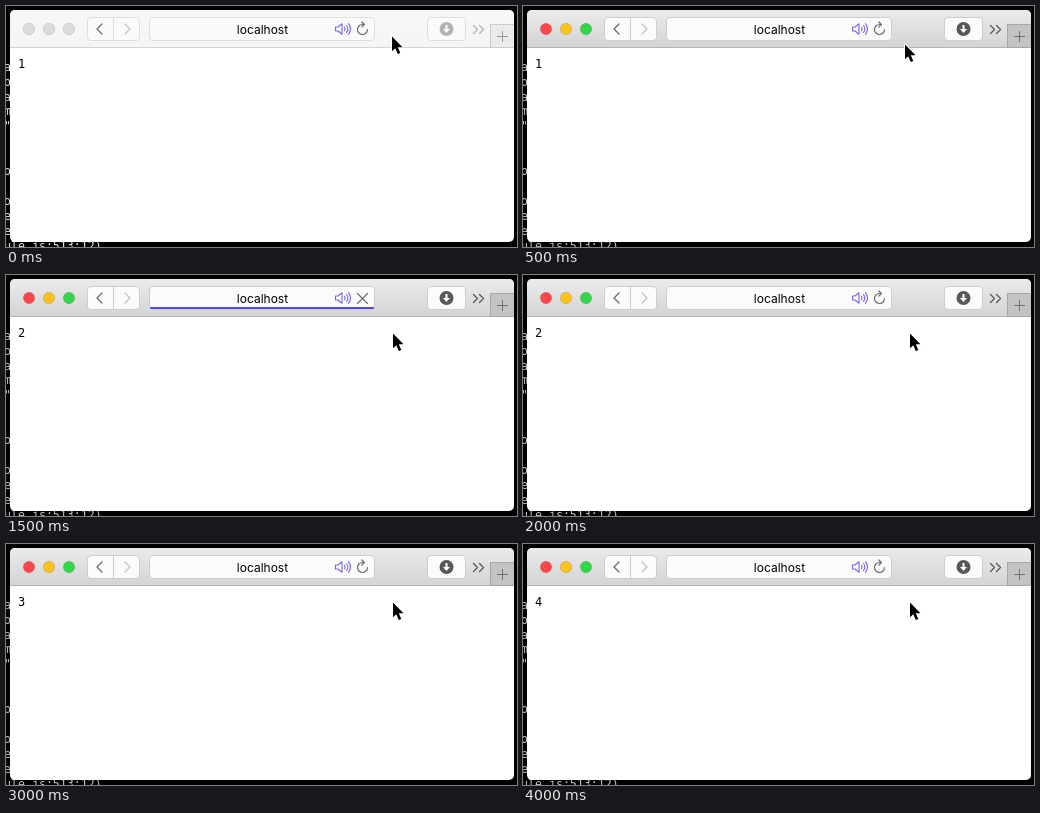
Write an HTML page that moves like this. It is 511x241 px and loops after 5250 ms.

```html
<!DOCTYPE html>
<html lang="en">
<head>
<meta charset="utf-8">
<title>localhost</title>
<style>
  html, body { margin: 0; width: 100%; height: 100%; overflow: hidden; background: #000; }
  svg {
    display: block; width: 511px; height: 241px;
    --top: #f7f7f7; --bottom: #f5f5f5; --line: #d4d4d4;
    --field: #fafafa; --edge: #dedede; --icon: #b2b2b2; --chevron: #6c6c6c;
    --tab: #ebebeb; --tabEdge: #cbcbcb; --plus: #979797;
    --red: #dcdcdc; --yellow: #dcdcdc; --green: #dcdcdc; --ring: #d0d0d0; --term: #e4e4e4;
  }
  svg.active {
    --top: #ebebeb; --bottom: #d4d4d4; --line: #b4b4b4;
    --field: #fbfbfb; --edge: #cdcdcd; --icon: #585858; --chevron: #6c6c6c;
    --tab: #c3c3c3; --tabEdge: #a6a6a6; --plus: #707070;
    --red: #fd464b; --yellow: #fdc21c; --green: #34d649; --ring: rgba(0,0,0,.12); --term: #c0c0c0;
  }
  svg.soft { --line: #f7f7f7; }
  .button { fill: var(--field); stroke: var(--edge); }
  .stroke { fill: none; stroke-width: 1.3; stroke-linecap: round; stroke-linejoin: round; }
  .mono { font-family: "DejaVu Sans Mono", monospace; white-space: pre; }
  .title { font: 12px Inter, sans-serif; text-anchor: middle; }
</style>
</head>
<body>
<svg id="stage" viewBox="0 0 511 241">
  <defs>
    <linearGradient id="chrome" x2="0" y2="1">
      <stop offset="0" style="stop-color:var(--top)"/>
      <stop offset="1" style="stop-color:var(--bottom)"/>
    </linearGradient>
    <clipPath id="frame"><rect x="4" y="4" width="504" height="232" rx="5"/></clipPath>
    <clipPath id="address"><rect x="144" y="12" width="224" height="23" rx="3"/></clipPath>
  </defs>

  <rect width="511" height="241"/>
  <g id="terminal" class="mono" font-size="11.6" style="fill:var(--term)"></g>

  <g clip-path="url(#frame)">
    <rect x="4" y="4" width="504" height="232" fill="#fff"/>
    <rect id="haze" x="4" y="41" width="504" height="12" fill="#fafafa"/>
    <rect x="4" y="4" width="504" height="37" fill="url(#chrome)"/>
    <rect x="4" y="41" width="504" height="1" style="fill:var(--line)"/>

    <g style="stroke:var(--ring)">
      <circle cx="23" cy="23" r="5.7" style="fill:var(--red)"/>
      <circle cx="43" cy="23" r="5.7" style="fill:var(--yellow)"/>
      <circle cx="63" cy="23" r="5.7" style="fill:var(--green)"/>
    </g>

    <rect class="button" x="81.5" y="11.5" width="52" height="23" rx="3.5"/>
    <path d="M107.5 12v22" style="stroke:var(--edge)"/>
    <path class="stroke" d="M96 18l-5 5 5 5" style="stroke:var(--chevron)"/>
    <path class="stroke" d="M119 18l5 5-5 5" stroke="#c2c2c2"/>

    <rect class="button" x="143.5" y="11.5" width="225" height="23" rx="3.5"/>
    <g clip-path="url(#address)">
      <rect id="bar" x="144" y="32" height="2" fill="#5148ee"/>
    </g>
    <text class="title" x="256.5" y="28">localhost</text>
    <path class="stroke" stroke="#7468ec" style="stroke-width:1.1"
      d="M329.5 21h2.5l4-3.2v10.4l-4-3.2h-2.500zM338.500 21.300q1.300 1.700 0 3.400M340.500 19.500q2.700 3.500 0 7M342.500 17.700q4 5.300 0 10.600"/>
    <path id="reload" class="stroke" stroke="#6e6e6e" style="stroke-width:1.2"
      d="M361.500 23.500a5 5 0 1 1-5-5h1.500M355.800 16l2.600 2.500-2.600 2.600"/>
    <path id="stop" class="stroke" stroke="#6e6e6e" style="stroke-width:1.2" d="M351.500 18.500l10 10m0-10l-10 10"/>

    <rect class="button" x="421.5" y="11.5" width="38" height="23" rx="3.5"/>
    <circle cx="440.500" cy="23" r="7" style="fill:var(--icon)"/>
    <path d="M439.500 19h2v4h2.500l-3.500 4-3.500-4h2.500z" fill="#fff"/>
    <path class="stroke" d="M467.500 19.500l4 4-4 4m6-8l4 4-4 4" style="stroke:var(--icon)"/>

    <rect x="484.500" y="18.500" width="25" height="23" style="fill:var(--tab);stroke:var(--tabEdge)"/>
    <path d="M496.500 25v11m-5.500-5.500h11" style="stroke:var(--plus)"/>

    <text id="count" class="mono" x="12" y="62" font-size="12"></text>
  </g>

  <path id="cursor" d="M0 0v14.800l3.300-3.100 2.500 5.800 2.500-1.100-2.500-5.600h4.700z"
    stroke="#fff" stroke-width="1.800" paint-order="stroke" stroke-linejoin="round"/>
</svg>
<script>
  const LOOP = 5250;
  const $ = id => document.getElementById(id);
  const show = (id, on) => $(id).setAttribute("visibility", on ? "visible" : "hidden");

  const pointer = [[0, 386, 30.5], [250, 379, 33.5], [500, 382, 38.5], [750, 383, 51.5], [1000, 387, 58.5]];
  const counter = [[0, 1], [1250, 2], [2250, 3], [3500, 4]];
  // time, bar width, bar opacity, loading
  const progress = [
    [0, 0, 0, false],
    [1250, 44, 1, true], [1500, 224, 1, true], [1750, 224, .4, false], [2000, 0, 0, false],
    [2250, 44, 1, true], [2500, 170, 1, true], [2750, 224, .4, false], [3000, 0, 0, false],
    [3500, 44, 1, true], [3750, 224, .4, false], [4000, 0, 0, false]
  ];

  const at = (steps, t) => steps.filter(s => s[0] <= t).pop().slice(1);

  const lines = [[65, "a"], [80, "o"], [95, "a"], [109, "m"], [124, '"'], [169, "o"],
    [199, "o"], [214, "e"], [229, "e"], [244, "ule.js:513:12)"]];
  for (const [y, text] of lines) {
    const row = document.createElementNS("http://www.w3.org/2000/svg", "text");
    row.setAttribute("x", -2);
    row.setAttribute("y", y);
    row.textContent = text;
    $("terminal").append(row);
  }

  function draw(t) {
    const [x, y] = at(pointer, t);
    const [width, opacity, loading] = at(progress, t);
    const soft = t >= 250 && t < 500;
    $("stage").classList.toggle("active", t >= 500);
    $("stage").classList.toggle("soft", soft);
    show("haze", soft);
    show("reload", !loading);
    show("stop", loading);
    $("bar").setAttribute("width", width);
    $("bar").setAttribute("opacity", opacity);
    $("count").textContent = at(counter, t)[0];
    $("cursor").setAttribute("transform", `translate(${x} ${y})`);
  }

  const start = performance.now();
  function tick() {
    draw((performance.now() - start) % LOOP);
    requestAnimationFrame(tick);
  }
  tick();
</script>
</body>
</html>
```
